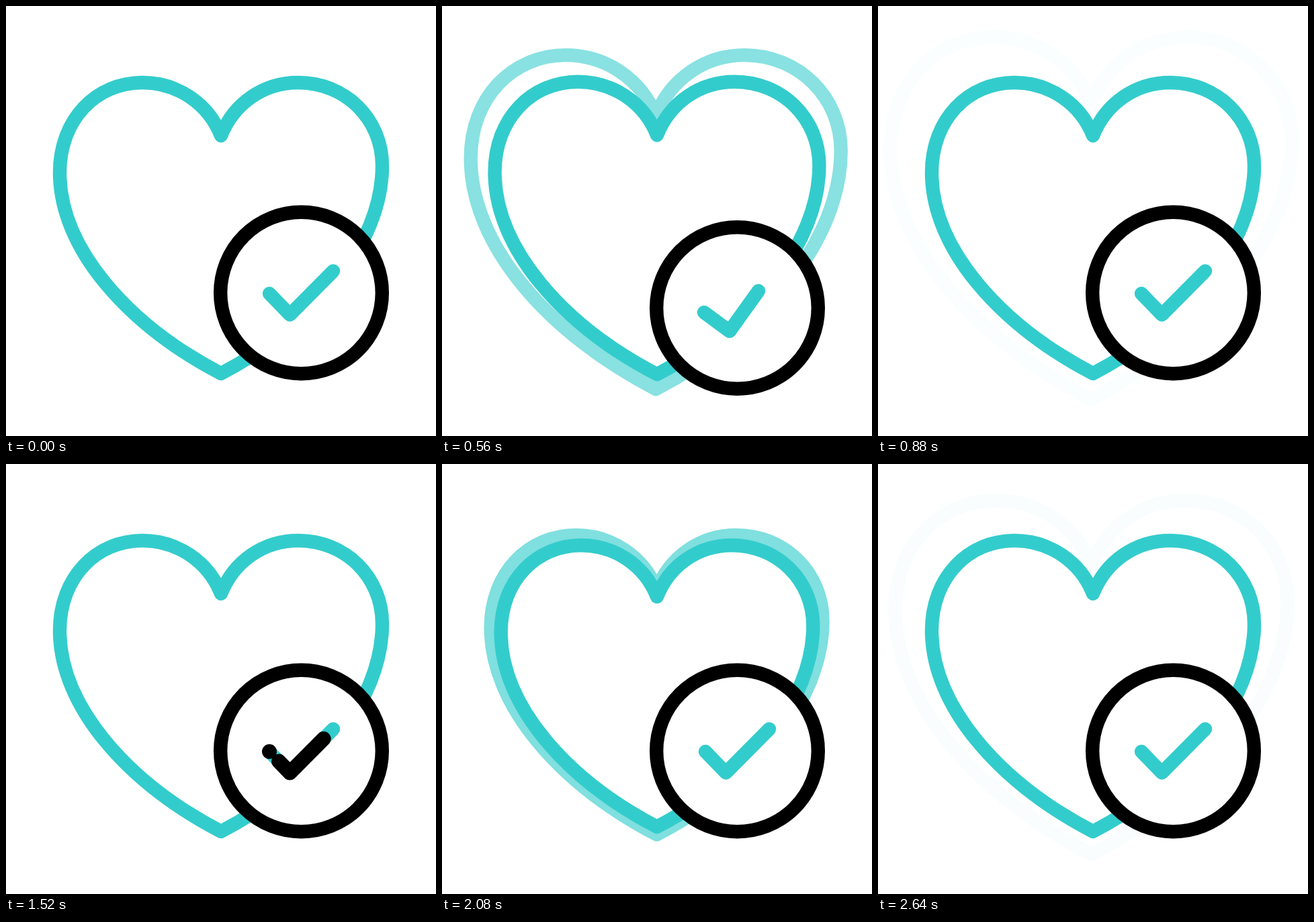
Recreate the animation shown at these times as an HTML page. Size 640x640 px, loop 3 s.

```html
<!DOCTYPE html>
<html lang="en">
<head>
<meta charset="utf-8">
<title>Heart with check</title>
<style>
  html, body { margin: 0; width: 100%; height: 100%; overflow: hidden; background: #fff; }
  svg { display: block; width: 100%; height: 100%; }
  path, circle { fill: none; stroke: #3cc; stroke-width: 20.4; stroke-linecap: round; stroke-linejoin: round;
    vector-effect: non-scaling-stroke; }
  #badge { fill: #fff; stroke: #000; }
  #ink { stroke: #000; stroke-width: 22; }
</style>
</head>
<body>
<svg viewBox="0 0 640 640">
  <defs>
    <path id="shape" d="M320 193C301 145 255 114 203 114C135 114 80 168 80 248C80 360 180 474 320 547
      C460 474 560 354 560 238C560 168 505 114 435 114C383 114 339 145 320 193Z"/>
  </defs>
  <use id="ghost" href="#shape"/>
  <use id="heart" href="#shape"/>
  <circle id="badge" cx="439.5" cy="427" r="120.3"/>
  <path id="tick"/>
  <path id="ink"/>
</svg>
<script>
const LOOP = 3000, STEP = 40;
const el = id => document.getElementById(id);
const [ghost, heart, badge, tick, ink] = ['ghost', 'heart', 'badge', 'tick', 'ink'].map(el);

// Smooth curve through [time, value] keys, flat at every extreme.
function track(...keys) {
  const slope = i => (keys[i + 1][1] - keys[i][1]) / (keys[i + 1][0] - keys[i][0]);
  const tangent = i => {
    if (i === 0 || i === keys.length - 1) return 0;
    const a = slope(i - 1), b = slope(i);
    return a * b <= 0 ? 0 : 2 * a * b / (a + b);
  };
  return t => {
    if (t <= keys[0][0]) return keys[0][1];
    const i = keys.findIndex(k => k[0] > t) - 1;
    if (i < 0) return keys[keys.length - 1][1];
    const [t0, v0] = keys[i], [t1, v1] = keys[i + 1];
    const d = t1 - t0, u = (t - t0) / d, s = u * u * (3 - 2 * u);
    return v0 + (v1 - v0) * s
      + d * u * (1 - u) * ((1 - u) * tangent(i) - u * tangent(i + 1));
  };
}

const heartScale = track([80, 1], [180, 1.01], [370, .965], [400, .971], [560, 1.006], [720, 1],
  [1640, 1], [1740, 1.01], [2050, .965], [2080, .968], [2240, 1.006], [2400, 1]);
const firstGhost = {
  scale: track([200, 1], [400, 1.042], [560, 1.148], [640, 1.229], [760, 1.262], [880, 1.245]),
  opacity: track([200, .6], [400, .58], [600, .57], [880, .015])
};
const secondGhost = {
  scale: track([1880, 1], [2080, 1.029], [2280, 1.183], [2640, 1.217]),
  opacity: track([1880, .62], [2120, .62], [2640, .025])
};
const jump = track([80, 0], [320, -80], [400, -59.5], [560, 22.5], [700, 0]);
const bend = (atTop, atLanding) => track([80, 0], [400, atTop], [560, atLanding], [700, 0]);
const tickPoints = [
  { x: 392, y: 428, dx: bend(18, 20.5), dy: bend(20.5, 5.5) },
  { x: 422.5, y: 459.5, dx: bend(7.5, 5.5), dy: bend(2.5, 2) },
  { x: 487, y: 394.5, dx: bend(0, -16), dy: bend(-19.5, 7) }
];
tickPoints[0].dx = bend(18, -2);
const inkReach = track([1160, 0], [1440, 1], [1660, 0]);

function scaleAbout(node, x, y, s) {
  node.setAttribute('transform', `translate(${x} ${y}) scale(${s}) translate(${-x} ${-y})`);
}

function draw(t) {
  scaleAbout(heart, 320, 330.5, heartScale(t));

  const wave = t < 1200 ? firstGhost : secondGhost;
  const visible = (t >= 200 && t < 1200) || t >= 1880;
  scaleAbout(ghost, 332, 390, wave.scale(t));
  ghost.setAttribute('opacity', visible ? wave.opacity(t) : 0);

  const lift = jump(t);
  badge.setAttribute('cy', 427 + lift);
  const d = 'M' + tickPoints.map(p => `${p.x + p.dx(t)} ${p.y + p.dy(t) + lift}`).join('L');
  tick.setAttribute('d', d);

  // The black stroke opens from the middle of the tick and closes again.
  const reach = inkReach(t), length = ink.getTotalLength();
  ink.setAttribute('d', d);
  ink.setAttribute('visibility', reach > 0 ? 'visible' : 'hidden');
  ink.setAttribute('stroke-dasharray', `0 ${length * (1 - reach) / 2} ${length * reach} ${length}`);
}

const start = performance.now();
function frame() {
  const t = (performance.now() - start) % LOOP;
  draw(Math.floor(t / STEP) * STEP);
  requestAnimationFrame(frame);
}
draw(0);
requestAnimationFrame(frame);
</script>
</body>
</html>
```
